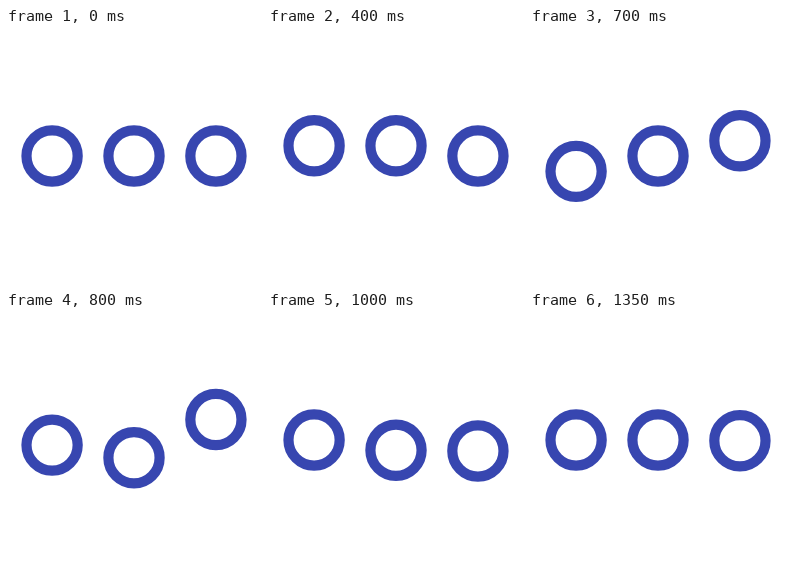
Write an HTML page that moves like this. It is 256 px wide and 256 px high and loops after 1.4 s.

```html
<!DOCTYPE html>
<html lang="en">
<head>
<meta charset="utf-8">
<title>Loading dots</title>
<style>
html, body { margin: 0; width: 100%; height: 100%; overflow: hidden; background: #fff; }
svg { display: block; width: 100vw; height: 100vh; }
circle { fill: none; stroke: #3746b0; stroke-width: 4; }
</style>
</head>
<body>
<svg viewBox="0 0 100 100">
  <circle cx="18" cy="50" r="10"/>
  <circle cx="50" cy="50" r="10"/>
  <circle cx="82" cy="50" r="10"/>
</svg>
<script>
const LOOP = 1400, LIFT = 8;
const stops = [0, -LIFT, LIFT, 0];
// start of each ring's bounce and length of one of its three strokes, in ms
const rings = [
  { start: 0, stroke: 300 },
  { start: 250, stroke: 300 },
  { start: 506, stroke: 294 }
];
const nodes = document.querySelectorAll('circle');
const ease = p => (1 - Math.cos(Math.PI * p)) / 2;

function offset(t, { start, stroke }) {
  const p = (t - start) / stroke;
  if (p <= 0 || p >= 3) return 0;
  const i = Math.floor(p);
  return stops[i] + (stops[i + 1] - stops[i]) * ease(p - i);
}

function draw(t) {
  rings.forEach((ring, i) => nodes[i].setAttribute('cy', 50 + offset(t, ring)));
}

let origin;
function tick(now) {
  origin ??= now;
  draw((now - origin) % LOOP);
  requestAnimationFrame(tick);
}
draw(0);
requestAnimationFrame(tick);
</script>
</body>
</html>
```
